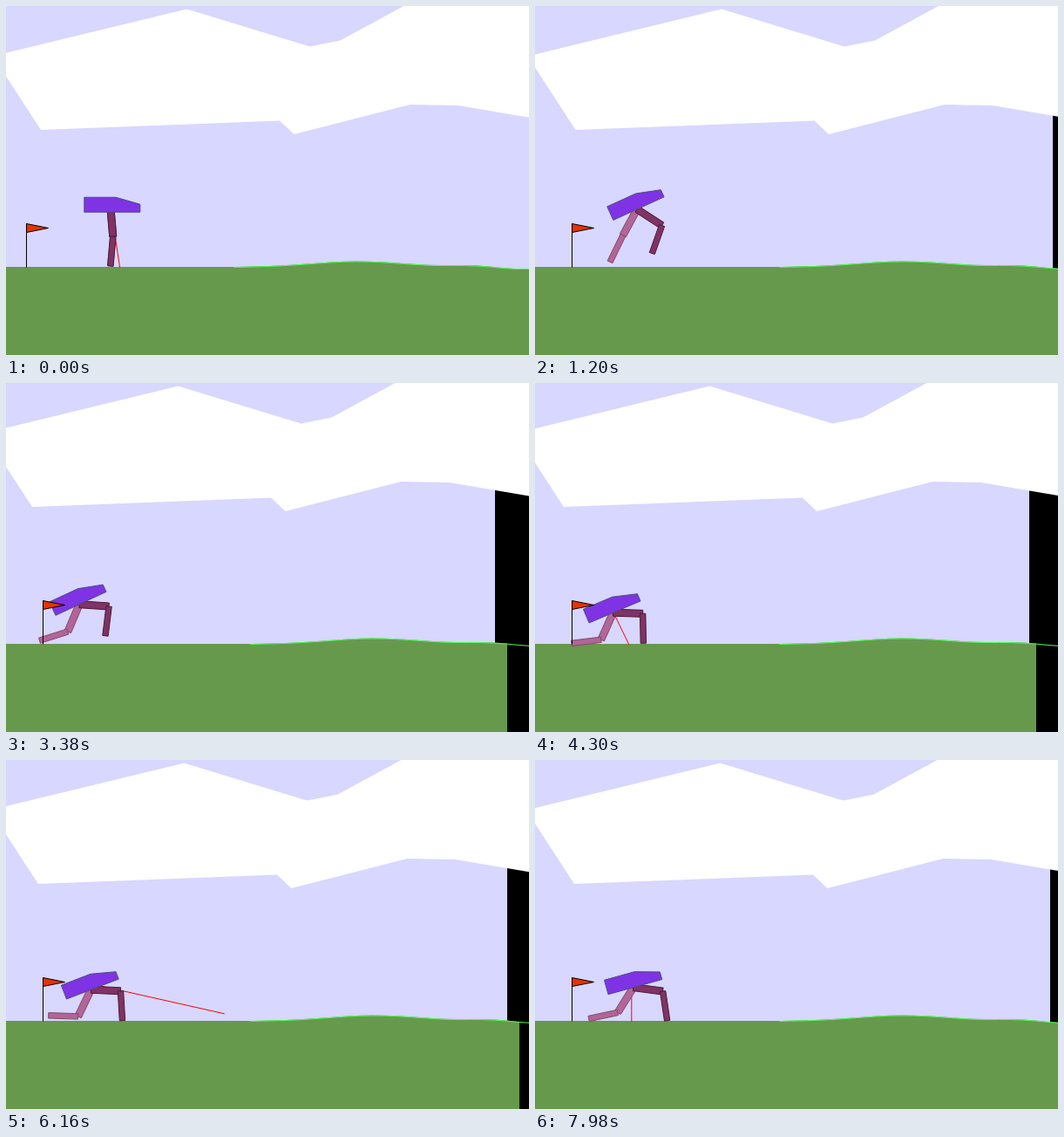
Write an HTML page with a canvas that moves like this. It is 600x400 px and loops after 8 s.

```html
<!DOCTYPE html>
<html>
<head>
<meta charset="utf-8">
<style>
html, body { margin: 0; width: 100%; height: 100%; overflow: hidden; background: #000; }
canvas { display: block; }
</style>
</head>
<body>
<canvas id="stage" width="600" height="400"></canvas>
<script>
const ctx = document.getElementById('stage').getContext('2d');
const W = 600, H = 400, LOOP = 8000, STEP = 20;
const TILE = 14, FLAT = 20 * TILE, GROUND = 299, LIMB = 34;

// Key poses; angles in degrees, legs as [thigh, shin] from straight down.
const poses = [
  { at: 0, scroll: 19, tilt: 0, rear: [5, -5], front: [5, -5] },
  { at: 1200, scroll: -6, tilt: -24.5, rear: [-28.5, -26], front: [57, -19.5] },
  { at: 2220, scroll: -24, tilt: 11.5, rear: [-45.5, -58.5], front: [55, -27] },
  { at: 3380, scroll: -39, tilt: -25, rear: [-23, -72.5], front: [86, -7] },
  { at: 5240, scroll: -26.3, tilt: -21, rear: [-25.5, -90], front: [89, 5] },
  { at: 7040, scroll: -24, tilt: -21, rear: [-26, -92.5], front: [85, 2] },
  { at: 7980, scroll: -9, tilt: -15.5, rear: [-32, -78], front: [82.5, 8.5] }
];
const cloud = [
  [-6, 57], [216.5, 3], [357.5, 46], [392.5, 39], [464.5, 0], [485, -11], [720, -11],
  [720, 146], [527.5, 113.5], [472.5, 112.5], [339.5, 146.5], [323, 131], [49, 141.5]
];
const hullShape = [[-30, -9], [6, -9], [34, -1], [34, 8], [-30, 8]];

const clamp = v => Math.max(0, Math.min(1, v));
const bump = (x, centre, width) => Math.exp(-(((x - centre) / width) ** 2));
const sin = deg => Math.sin(deg * Math.PI / 180);
const cos = deg => Math.cos(deg * Math.PI / 180);

function heightAt(x) {
  if (x <= FLAT) return GROUND;
  return GROUND - 6.5 * bump(x, 422, 75) - 1.5 * bump(x, 545, 30) + 2 * clamp((x - 570) / 30);
}

// Slope that stays flat at turning points, so keys are never overshot.
function slope(i, get) {
  const a = poses[i - 1], b = poses[i], c = poses[i + 1];
  if (!a || !c) return 0;
  const left = (get(b) - get(a)) / (b.at - a.at), right = (get(c) - get(b)) / (c.at - b.at);
  return left * right <= 0 ? 0 : 2 * left * right / (left + right);
}

function sample(t, get) {
  let i = 0;
  while (i < poses.length - 2 && t > poses[i + 1].at) i++;
  const a = poses[i], b = poses[i + 1], span = b.at - a.at;
  const u = clamp((t - a.at) / span), v = 1 - u;
  return v * v * (1 + 2 * u) * get(a) + u * u * (3 - 2 * u) * get(b)
    + span * u * v * (v * slope(i, get) - u * slope(i + 1, get));
}

function polygon(points, fill, stroke) {
  ctx.beginPath();
  points.forEach(p => ctx.lineTo(...p));
  ctx.closePath();
  ctx.fillStyle = fill;
  ctx.fill();
  if (stroke) {
    ctx.strokeStyle = stroke;
    ctx.stroke();
  }
}

function line(x1, y1, x2, y2, color) {
  ctx.beginPath();
  ctx.moveTo(x1, y1);
  ctx.lineTo(x2, y2);
  ctx.strokeStyle = color;
  ctx.stroke();
}

function limb([x, y], angle, half, fill, stroke) {
  const end = [x + LIMB * sin(angle), y + LIMB * cos(angle)];
  const dx = half * cos(angle), dy = -half * sin(angle);
  polygon([
    [x - dx, y - dy], [x + dx, y + dy],
    [end[0] + dx, end[1] + dy], [end[0] - dx, end[1] - dy]
  ], fill, stroke);
  return end;
}

function drawLeg(hip, [thigh, shin], fill, stroke) {
  limb(limb(hip, thigh, 4, fill, stroke), shin, 3.2, fill, stroke);
}

// How far a leg reaches below the hip.
const reachDown = ([thigh, shin]) => LIMB * (cos(thigh) + Math.max(0, cos(shin)));

function drawGround(scroll, offset) {
  const end = Math.floor((W + scroll) / TILE) * TILE + TILE;
  const top = [];
  for (let x = 0; x <= end; x += TILE) top.push([x + offset, heightAt(x)]);
  const edge = end + offset + 1;
  polygon([...top, [edge, heightAt(end)], [edge, H], [offset, H]], 'rgb(102,153,76)');
}

function drawGrass(offset) {
  for (let x = FLAT; x < W - offset; x += TILE) {
    line(x + offset, heightAt(x), x + TILE + offset, heightAt(x + TILE), 'rgb(76,255,76)');
  }
}

// One of ten sensor rays per step: out, back, then a pause.
function drawRay(step, x, y) {
  const n = (step + 1) % 100;
  if (n >= 20) return;
  const angle = 0.15 * (n < 10 ? n : 19 - n);
  const reach = Math.min(160, (GROUND + 0.5 - y) / Math.cos(angle));
  line(x, y, x + reach * Math.sin(angle), y + reach * Math.cos(angle), '#f00');
}

function drawWalker(step, t, x) {
  const tilt = sample(t, p => p.tilt);
  const [rear, front] = ['rear', 'front'].map(leg => [0, 1].map(j => sample(t, p => p[leg][j])));
  // The lowest foot carries the body, apart from two hops.
  const hop = 5.3 * bump(t, 1200, 850) + 3.5 * bump(t, 3380, 600);
  const hip = [x - 8 * sin(tilt), GROUND - 0.8 - hop - Math.max(reachDown(rear), reachDown(front))];
  // The legs start pushed up into the hull and settle at once.
  const gap = 6 * clamp(1 - t / 100);
  const y = hip[1] + gap - 8 * cos(tilt);

  drawRay(step, x, y);
  drawLeg(hip, rear, 'rgb(178,101,152)', 'rgb(127,76,101)');
  drawLeg(hip, front, 'rgb(128,51,102)', 'rgb(77,26,51)');
  polygon(
    hullShape.map(([px, py]) =>
      [x + px * cos(tilt) - py * sin(tilt), y + px * sin(tilt) + py * cos(tilt)]),
    'rgb(127,51,229)', 'rgb(76,76,127)');
}

function drawFlag(x) {
  line(x, 249, x, GROUND, '#000');
  polygon([[x, 249], [x, 259], [x + 25, 254]], 'rgb(230,51,0)', '#000');
}

function draw(time) {
  const step = Math.floor((time % LOOP) / STEP), t = step * STEP;
  const scroll = sample(t, p => p.scroll);
  const offset = -Math.floor(Math.max(0, scroll));

  ctx.setTransform(1, 0, 0, 1, 0, 0);
  ctx.fillStyle = '#000';
  ctx.fillRect(0, 0, W, H);
  ctx.fillStyle = 'rgb(215,215,255)';
  ctx.fillRect(0, 0, Math.min(W, Math.round(W + scroll)), GROUND + 3);
  drawGround(scroll, offset);

  ctx.translate(0.5, 0.5);
  ctx.lineJoin = 'round';
  polygon(cloud.map(([x, y]) => [x - Math.abs(scroll) / 2, y]), '#fff');
  drawGrass(offset);
  drawWalker(step, t, 119.3 + Math.min(0, scroll));
  drawFlag(42 + offset);
}

const start = performance.now();
function tick() {
  draw(performance.now() - start);
  requestAnimationFrame(tick);
}
tick();
</script>
</body>
</html>
```
